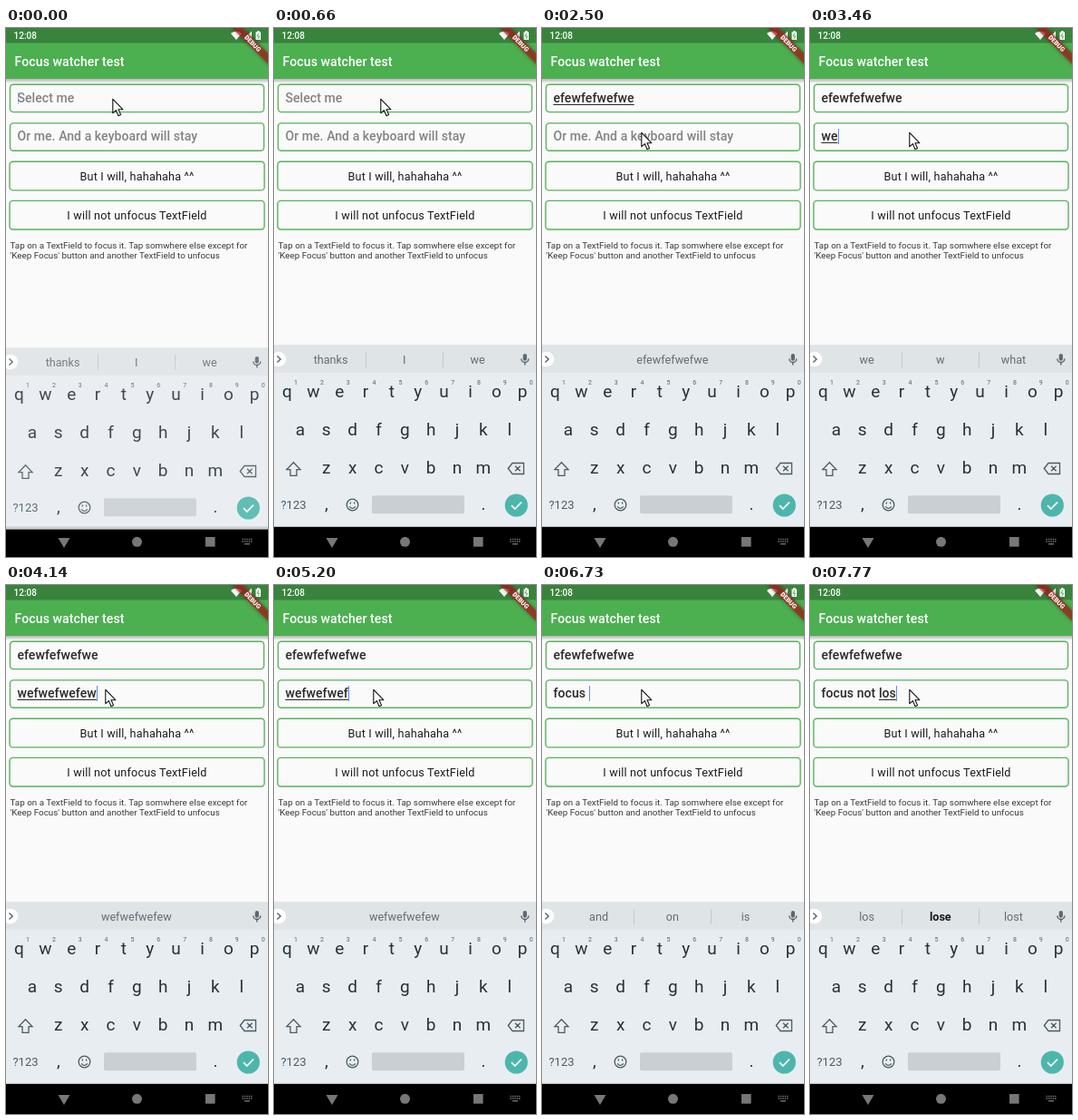
An HTML page that plays this animation: 289x583 px, repeating every 8000 ms.

```html
<!DOCTYPE html>
<html lang="en">
<head>
<meta charset="utf-8">
<title>Focus watcher test</title>
<style>
  html, body { margin: 0; width: 100%; height: 100%; overflow: hidden; background: #fafafa; }
  #stage { position: absolute; left: 0; top: 0; width: 289px; height: 583px; overflow: hidden; font-family: Roboto, sans-serif; }
  svg { position: absolute; left: 0; top: 0; }
  .field {
    position: absolute; left: 12.4px; height: 16px; line-height: 16px;
    font-size: 14.05px; font-weight: 500; letter-spacing: .06px; white-space: pre; color: #2a2a2a;
  }
  .field.empty { color: #838383; }
  .field u { text-decoration: underline 1px; text-underline-offset: 1.5px; text-decoration-skip-ink: none; }
  .caret { position: absolute; top: 0; width: 1.4px; height: 16.4px; background: #5b8fee; }
  .empty .caret { left: .4px; top: 2.3px; height: 13px; }
  .mid { text-anchor: middle; }
  .keys { font-size: 19px; fill: #263238; }
  .digits { font-size: 7px; fill: #55636a; }
  .words { font-size: 12.64px; fill: #616d74; }
  .words .bold { font-weight: 700; fill: #15191b; }
  .line { fill: none; stroke: #4a5a63; stroke-width: 1.3; }
</style>
</head>
<body>
<div id="stage">
  <svg width="289" height="583">
    <defs>
      <linearGradient id="shade" x2="0" y2="1">
        <stop stop-opacity=".28"/><stop offset="1" stop-opacity="0"/>
      </linearGradient>
    </defs>
    <rect width="289" height="583" fill="#fafafa"/>
    <rect y="56" width="289" height="5" fill="url(#shade)"/>
    <rect width="289" height="56" fill="#4caf50"/>
    <rect width="289" height="16.5" fill="#39833c"/>
    <text x="9.6" y="41.6" font-size="14.05" font-weight="500" letter-spacing=".08" fill="#fff">Focus watcher test</text>

    <g fill="#fff">
      <text x="8.6" y="11.8" font-size="10" font-weight="500">12:08</text>
      <path d="M248 6Q254 1.600 260 6L254 13Z"/>
      <path d="M262 12.500L271 3.500V12.500Z"/>
      <path d="M275.500 4.500H277V3.200H279.600V4.500H281V13H275.500Z"/>
      <path d="M278.700 5.500L277 9H279.500L278 12" fill="none" stroke="#39833c" stroke-width=".8"/>
    </g>
    <g transform="translate(289 0) rotate(45)">
      <rect x="-29" y="19.7" width="58" height="8.4" fill="#b71c1c" fill-opacity=".66" style="filter:drop-shadow(0 0 2px #0008)"/>
      <text class="mid" y="26.4" font-size="7" font-weight="900" fill="#fff">DEBUG</text>
    </g>

    <g fill="none" stroke="#57b35b" stroke-width="1.4">
      <rect x="4.500" y="62.300" width="280" height="30.300" rx="3.500"/>
      <rect x="4.500" y="104.900" width="280" height="30.300" rx="3.500"/>
      <rect x="4" y="147.300" width="281" height="31.600" rx="3.500"/>
      <rect x="4" y="190.400" width="281" height="31.600" rx="3.500"/>
    </g>
    <g class="mid" font-size="12.64" letter-spacing=".18" fill="#1c1c1c">
      <text x="144.500" y="167.500">But I will, hahahaha ^^</text>
      <text x="144.500" y="210.700">I will not unfocus TextField</text>
    </g>
    <g font-size="9.85" fill="#3a3a3a">
      <text x="4.500" y="243">Tap on a TextField to focus it. Tap somwhere else except for</text>
      <text x="4.500" y="254.400">'Keep Focus' button and another TextField to unfocus</text>
    </g>

    <rect y="549.400" width="289" height="34" fill="#000"/>
    <g fill="#777">
      <path d="M57.500 562H70.500L64 573Z"/>
      <circle cx="144.500" cy="566.300" r="5.500"/>
      <rect x="220" y="561" width="10.600" height="10.600"/>
      <path d="M260.500 563.500H271.500M260.500 566H271.500" stroke="#777" stroke-width="1.4" stroke-dasharray="1.4 1"/>
      <rect x="263" y="568" width="6" height="1.300"/>
    </g>

    <g id="keyboard">
      <rect y="349.300" width="289" height="200.300" fill="#e8edf1"/>
      <rect y="349.300" width="289" height="30.700" fill="#dfe4e7"/>
      <circle cx="5" cy="365" r="8.300" fill="#fff"/>
      <path class="line" d="M3.500 361.500L7.200 365L3.500 368.500"/>
      <path id="dividers" d="M101.500 357V374M186.500 357V374" stroke="#c3c9cc"/>
      <g class="words mid">
        <text x="62.600" y="369.500"></text>
        <text x="143.800" y="369.500"></text>
        <text x="224.500" y="369.500"></text>
      </g>
      <rect x="274.700" y="359" width="4.200" height="7.800" rx="2.100" fill="#5d686f"/>
      <path class="line" d="M272.800 364.500A4 4 0 0 0 280.800 364.500M276.800 368.500V371.500"/>
      <g id="keys" class="keys mid"></g>
      <path class="line" d="M21.500 478.800L29 486.600H25V493.300H18V486.600H14Z"/>
      <path class="line" d="M258.300 485.500L263 479.500H275.500V491.500H263ZM266 482.700L271.600 488.300M271.600 482.700L266 488.300"/>
      <text class="mid" x="21.500" y="530" font-size="13" fill="#4a5a63">?123</text>
      <circle class="line" cx="86.500" cy="525.500" r="6.300"/>
      <path class="line" d="M83.200 527.300Q86.500 531.500 89.800 527.300M84.400 522.500V524.400M88.600 522.500V524.400"/>
      <rect x="108" y="515.300" width="102" height="20" rx="2" fill="#c9cfd3"/>
      <circle cx="267.300" cy="526" r="12.600" fill="#4db6ac"/>
      <path d="M262 526.200L265.800 530L273 522.600" fill="none" stroke="#fff" stroke-width="1.7"/>
    </g>
  </svg>

  <div class="field" style="top:68.600px"></div>
  <div class="field" style="top:111.300px"></div>

  <svg width="289" height="583">
    <path id="pointer" d="M0 0V15.500L3.600 12.300L6.200 18.400L8.800 17.300L6.200 11.400H11Z" fill="#fff" stroke="#111" stroke-width="1.1" stroke-linejoin="round"/>
  </svg>
</div>

<script>
const LOOP = 8000, LAG = 60;
const $ = s => document.querySelector(s);
const fields = document.querySelectorAll('.field');
const words = document.querySelectorAll('.words text');
const hints = ['Select me', 'Or me. And a keyboard will stay'];

// Key caps
const rows = [['qwertyuiop', 14.500, 407], ['asdfghjkl', 28.900, 449.300], ['zxcvbnm', 57.800, 491.300]];
const cap = (c, x, y, cls = '') => `<text x="${x}" y="${y}" class="${cls}">${c}</text>`;
let caps = cap(',', 57.800, 531) + cap('.', 231, 531);
for (const [chars, x, y] of rows) {
  [...chars].forEach((c, i) => {
    caps += cap(c, x + i * 28.850, y);
    if (chars.length === 10) caps += cap((i + 1) % 10, x + 9.500 + i * 28.850, 393, 'digits');
  });
}
$('#keys').innerHTML = caps;

// Each edit: [time, text]
const type = (text, times, start = '') =>
  times.map((t, i) => [t, start + text.slice(0, i + 1)]);
const evenly = (from, step, n) => Array.from({ length: n }, (_, i) => from + step * i);

const first = [[0, ''], ...type('efewfefwefwe',
  [1340, 1400, 1510, 1570, 1670, 1730, 1790, 1840, 1890, 1940, 2000, 2060])];
const phrase = 'wefwefwefew';
const second = [
  [0, ''],
  ...type(phrase, evenly(3350, 73, 11)),
  [4700, phrase.slice(0, 10)],
  ...evenly(5160, 43, 10).map((t, i) => [t, phrase.slice(0, 9 - i)]),
  ...type('focus ', [5970, 6070, 6180, 6290, 6420, 6730]),
  ...type('not los', [7100, 7180, 7260, 7370, 7480, 7590, 7700], 'focus '),
];
const at = (list, t) => list.filter(e => e[0] <= t).pop()[1];

// A leading * marks the bold guess
const guesses = {
  '': 'thanks I we', e: 'and e eat', ef: 'ef of off', w: 'we w what',
  f: 'for f from', fo: 'fo *for from', foc: 'foc *focus focused', focu: 'focu *focus focused',
  focus: 'Focus focus focused', 'focus ': 'and on is',
  n: 'no n not', no: 'not no now', not: 'note not nothing', 'focus not ': 'sure the a',
  l: 'like l let', lo: 'lo *look love', los: 'los *lose lost',
};

function suggest(t) {
  if (t >= 4140 && t < 5970 + LAG) return ['', phrase, ''];
  const lagged = Math.max(0, t - LAG);
  const now = at(second, t);
  const text = t < 2950 ? at(first, lagged) : now.endsWith(' ') ? now : at(second, lagged);
  const key = text.endsWith(' ') ? text : text.split(' ').pop();
  return key in guesses ? guesses[key].split(' ') : ['', key, ''];
}

// Spans in which the caret is hidden
const dark = [[660, 1150], [2500, 2820], [4580, 4700], [5840, 5970]];

function drawField(i, text, caret, underlined) {
  const cut = text.lastIndexOf(' ') + 1;
  const head = text.slice(0, cut), tail = text.slice(cut);
  const mark = caret ? '<span class="caret"></span>' : '';
  fields[i].classList.toggle('empty', !text);
  fields[i].innerHTML = text
    ? head + (underlined ? `<u>${tail}</u>` : tail) + mark
    : mark + hints[i];
}

function draw(t) {
  const caret = !dark.some(([a, b]) => t >= a && t < b);
  const onFirst = t < 2760;
  drawField(0, at(first, t), caret && onFirst, onFirst);
  drawField(1, at(second, t), caret && !onFirst, true);
  const mark = $('.caret');
  if (mark && t < 60) mark.style.opacity = .6;

  const list = suggest(t);
  words.forEach((el, i) => {
    el.textContent = list[i].replace('*', '');
    el.classList.toggle('bold', list[i][0] === '*');
  });
  $('#dividers').style.display = list[0] ? '' : 'none';

  const drop = t < 60 ? 3 : t < 110 ? 2 : t < 170 ? 1 : 0;
  $('#keyboard').setAttribute('transform', `translate(0 ${drop})`);
  $('#keyboard').setAttribute('opacity', 1 - drop * .04);

  const step = Math.max(0, Math.min(7, Math.floor((t - 2170) / 55) + 1)) / 7;
  const ease = step * step * (3 - 2 * step);
  $('#pointer').setAttribute('transform', `translate(${117.800 - 8 * ease} ${78.300 + 37 * ease})`);
}

const start = performance.now();
function frame() {
  draw((performance.now() - start) % LOOP);
  requestAnimationFrame(frame);
}
frame();
</script>
</body>
</html>
```
